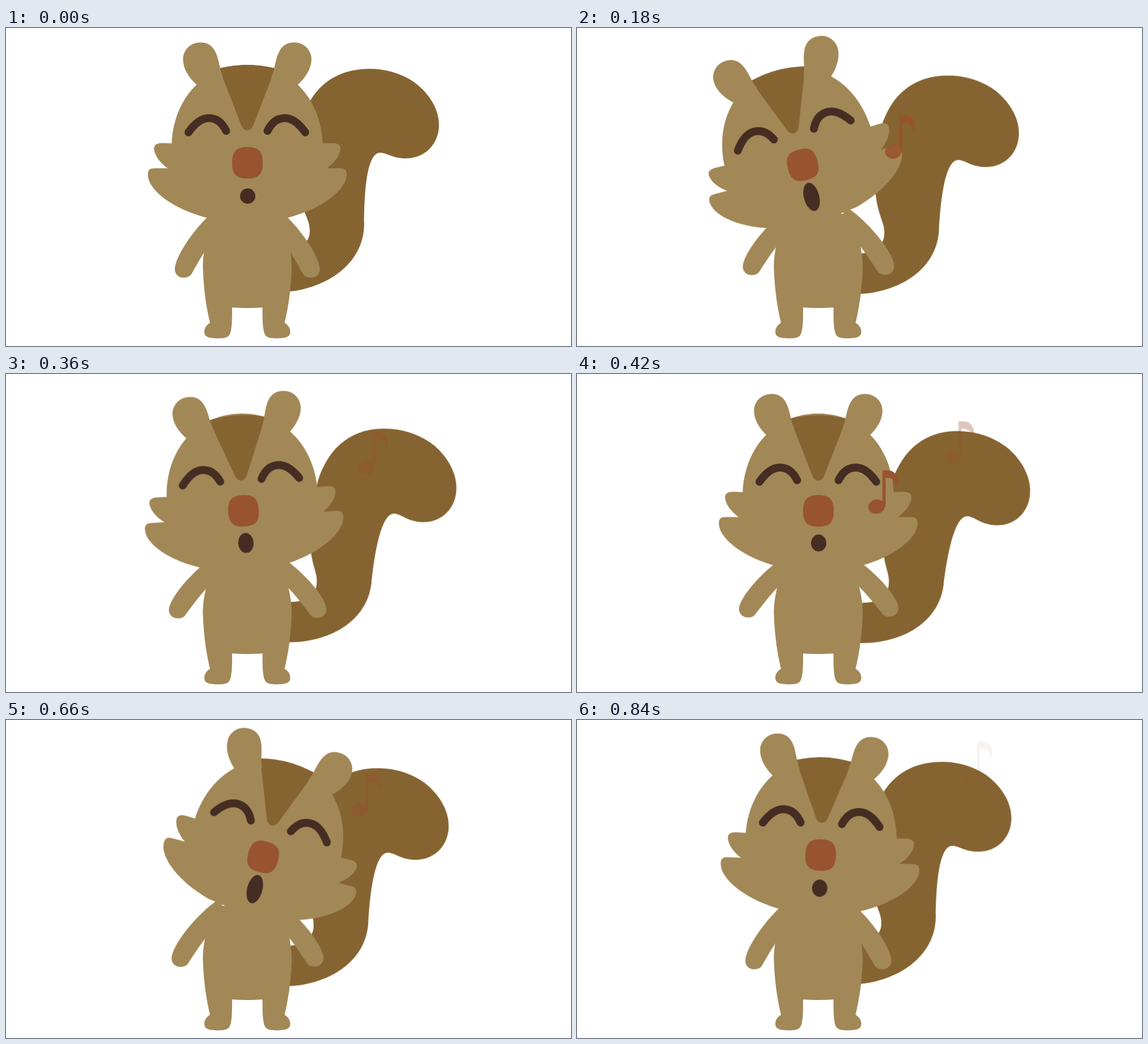
Animation, 997 px wide and 561 px high, one loop 870 ms. Source, as an HTML page:

```html
<!DOCTYPE html>
<html lang="en">
<head>
<meta charset="utf-8">
<title>Singing squirrel</title>
<style>
  html, body { margin: 0; width: 100%; height: 100%; overflow: hidden; background: #fff; }
  svg { display: block; width: 997px; height: 561px; }
  .fur { fill: #a28857; }
  .dark { fill: #866431; }
  .red { fill: #98532f; }
  .ink { fill: #452d23; }
  .line { fill: none; stroke: #452d23; stroke-width: 14; stroke-linecap: round; }
</style>
</head>
<body>
<svg viewBox="0 0 997 561">
  <g id="tail" class="dark">
    <path d="M470 466 L500 465 C560 459 632 420 632 345 C632 300 635 220 660 220
      C672 220 682 230 705 230 C740 230 764 204 764 171 C764 138 741 110 718 94
      C697 80 670 72 642 72 C600 72 562 87 537 128 C526 148 521 165 519 179
      C512 215 512 255 517 288 C520 305 523 314 527 325 C532 338 536 345 536 358
      C536 366 534 371 530 377 C520 389 508 392 495 394 L470 400 Z"/>
  </g>

  <g id="armL" class="fur">
    <path id="arm" d="M375 317 C350 333 302 392 298 424 C297 433 304 440.5 313 440.5
      C322 440.5 326 437 329 431 C337 417 346 400 362 378 L395 350 Z"/>
  </g>
  <g id="armR" class="fur"><use href="#arm" transform="translate(851.6) scale(-1 1)"/></g>

  <g class="fur">
    <path id="body" d="M432 320 L370 330 C352 370 347 400 347.5 425 C349 465 354 495 360 520
      C352 525 350 531 350 536 C350 544 356 547.5 374 547.5 C390 547.5 395 545 397 533
      C399 523 399 510 399 493 Q412 494 426 494 H432 Z"/>
    <use href="#body" transform="translate(851.6) scale(-1 1)"/>
  </g>

  <g id="head" class="fur">
    <path id="face" d="M415 65 H426 C500 65 555 122 559 203.5 L576 203 C588 203 591 208 590 215
      C588 228 577 240 566 247.5 L590 247.5 C598 247.5 601.5 251 601 260
      C600 285 560 318 498 334.5 L415 345 Z"/>
    <use href="#face" transform="translate(851.4) scale(-1 1)"/>
  </g>
  <g id="stripe" class="dark">
    <path d="M376 71 Q425.7 59 475.4 71 L437 170 Q433 180.5 425.7 180.5 Q418.4 180.5 414.5 170 Z"/>
  </g>
  <g id="ears" class="fur">
    <path id="ear" d="M473 73 C478 50 482 25.5 508 25.5 C526 25.5 539 39 539 55
      C539 72 528 88 516 99 L500 120 L468 88 Z"/>
    <use href="#ear" transform="translate(851.4) scale(-1 1)"/>
  </g>
  <g id="eyes" class="line">
    <path id="eye" d="M322 184 C332 170 345 159 358 159 S381 166 388.5 181.5"/>
    <use href="#eye" transform="translate(850) scale(-1 1)"/>
  </g>
  <g id="nose" class="red">
    <path d="M426 210 C446 210 453 218 453 238 S446 265.5 426 265.5 S399 258 399 238 S406 210 426 210 Z"/>
  </g>
  <g id="mouth" class="ink"><circle cx="426.5" cy="296.5" r="13.5"/></g>

  <g id="note1" class="red">
    <g id="note">
      <ellipse rx="14.5" ry="12.5" transform="rotate(-12)"/>
      <path d="M10.5 0 V-64 H20 C32 -64 41 -52 37 -37 L34 -37 C34 -47 26 -51 16 -51 V0 Z"/>
    </g>
  </g>
  <g id="note2" class="red"><use href="#note"/></g>
</svg>
<script>
const STEP = 30, COUNT = 29;

// rows: [step, properties]; every step holds for STEP ms
function play(id, rows) {
  const keys = rows.map(([at, props], i) => {
    const gap = i + 1 < rows.length ? rows[i + 1][0] - at : 0;
    return { ...props, offset: at / COUNT, easing: gap ? `steps(${gap}, end)` : 'linear' };
  });
  document.getElementById(id).animate(keys, {
    duration: STEP * COUNT, iterations: Infinity, delay: -1
  });
}

// Swing out to an angle and back around a fixed pivot
function swing(id, x, y, angle) {
  const pose = a => ({
    transform: `translate(${x}px, ${y}px) rotate(${a}deg) translate(${-x}px, ${-y}px)`
  });
  play(id, [[0, pose(0)], [14, pose(angle)], [29, pose(0)]]);
}

// Tilt around the neck; each part travels in a straight line between the tilted poses
const NECK = { x: 425.7, y: 345 }, TILT = 15;
function tilt(id, cy, sizes = [1, 1, 1]) {
  const r = NECK.y - cy, rad = TILT * Math.PI / 180;
  const dx = r * Math.sin(rad), dy = r * (1 - Math.cos(rad));
  const pose = (side, drop, sy) => ({
    transform: `translate(${NECK.x + side * dx}px, ${cy + drop * dy}px) ` +
      `rotate(${side * TILT}deg) scale(1, ${sy}) translate(${-NECK.x}px, ${-cy}px)`
  });
  const [rest, open, mid] = sizes;
  play(id, [
    [0, pose(0, 0, rest)], [6, pose(-1, 1, open)], [14, pose(0, 1, mid)],
    [22, pose(1, 1, open)], [29, pose(0, 0, rest)]
  ]);
}

// Drift up and fade out
function drift(id, start, end, from, to) {
  const pose = ([x, y], opacity) => ({ transform: `translate(${x}px, ${y}px)`, opacity });
  const rows = [[0, pose(from, 0)], [start, pose(from, 0)], [start, pose(from, 1)], [end, pose(to, 0)]];
  if (end < COUNT) rows.push([COUNT, pose(to, 0)]);
  play(id, rows);
}

swing('tail', 422, 480, 7);
swing('armL', 386, 334, 8);
swing('armR', 465.6, 334, -9);

tilt('head', 205);
tilt('stripe', 123);
tilt('ears', 62);
tilt('eyes', 170);
tilt('nose', 238);
tilt('mouth', 296.5, [1, 1.9, 1.11]);

drift('note1', 4, 19, [532, 235.5], [728, 103.5]);
drift('note2', 14, 29, [528.5, 234], [707, 92]);
</script>
</body>
</html>
```
